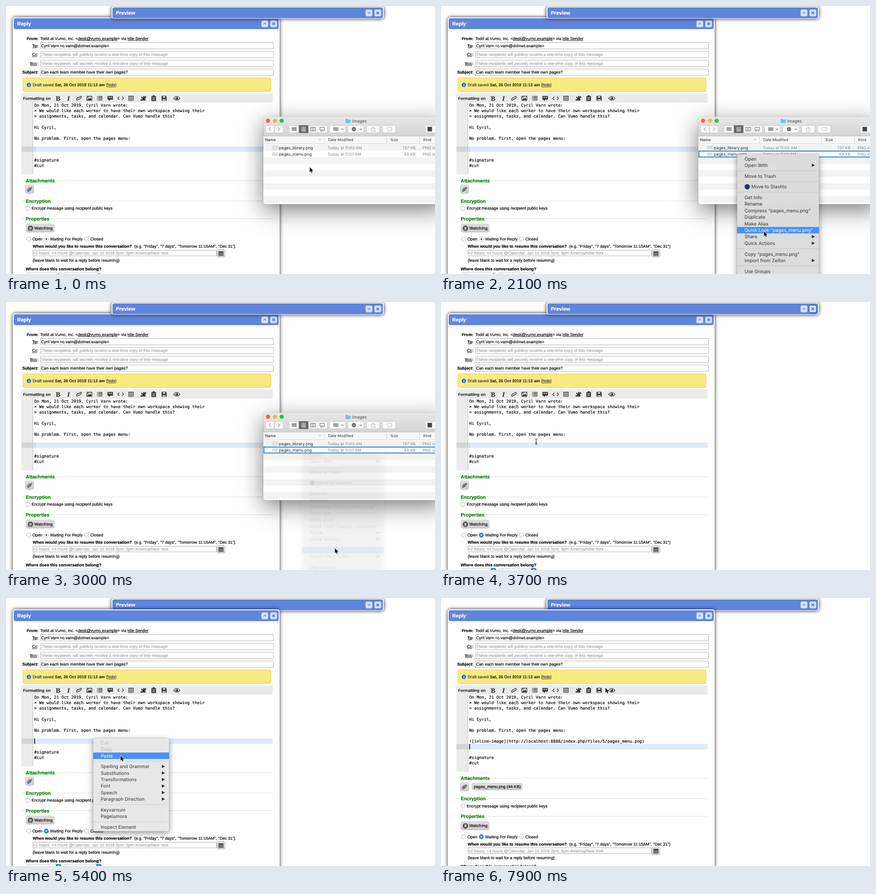
These frames come from a looping animation (947x591 px, 8 s). An HTML page with a canvas:

```html
<!DOCTYPE html>
<html lang="en">
<head>
<meta charset="utf-8">
<title>Pasting an image into a reply</title>
<style>
html, body { margin: 0; width: 100%; height: 100%; overflow: hidden; background: #fff; }
canvas { display: block; width: 947px; height: 591px; }
</style>
</head>
<body>
<canvas id="stage" width="947" height="591"></canvas>
<script>
const c = document.getElementById('stage').getContext('2d');
const SANS = '"Liberation Sans", Arial, sans-serif';
const SERIF = '"Liberation Serif", serif';
const UI = 'Inter, sans-serif';
const MONO = '"DejaVu Sans Mono", monospace';
const LOOP = 8000, STEP = 100, LINE = 12.1;
const BLUE = '#6085dc', SELECT = '#4990f6', INK = '#333';

// Moments of the story, in ms
const FILE_MENU = 1400, ACTIVATE = 3700, EDIT_MENU = 4400, PASTED = 5700;

// Pointer path: time, x, y
const POINTER = [
  [0, 670.5, 355.5], [600, 654, 326], [1800, 654, 326], [2100, 713, 497],
  [2400, 716, 500], [2700, 726, 543], [3000, 726, 543], [3600, 210, 308],
  [4000, 210, 308], [4300, 192, 309], [4500, 192, 309], [4900, 253, 348],
  [5900, 253, 348], [6300, 155, 312], [6800, 155, 312], [7700, 376, 156],
  [7900, 363, 198]
];

const FILE_ITEMS = ['Open', 'Open With>', '', 'Move to Trash', '', '@Move to Stashlo', '',
  'Get Info', 'Rename', 'Compress “pages_menu.png”', 'Duplicate', 'Make Alias',
  'Quick Look “pages_menu.png”', 'Share>', 'Quick Actions>', '',
  'Copy “pages_menu.png”', 'Import from Zelfon>', '', 'Use Groups'];
const EDIT_ITEMS = ['~Cut', '~Copy', 'Paste', '', 'Spelling and Grammar>', 'Substitutions>',
  'Transformations>', 'Font>', 'Speech>', 'Paragraph Direction>', '',
  'Keyvarnum', 'Pagelumora', '', 'Inspect Element'];

function pointerAt(t) {
  const i = POINTER.findIndex(k => k[0] > t);
  if (i < 0) return POINTER.at(-1).slice(1);
  const [t0, x0, y0] = POINTER[i - 1], [t1, x1, y1] = POINTER[i];
  const p = (t - t0) / (t1 - t0), e = p * p * (3 - 2 * p);
  return [x0 + (x1 - x0) * e, y0 + (y1 - y0) * e];
}

// y is the middle of the capital letters; returns the end of the text
function text(s, x, y, { size = 9.08, font = SANS, color = '#000', style = '', under, align = 'left' } = {}) {
  c.font = `${style} ${size}px ${font}`;
  c.textRendering = 'geometricPrecision';
  c.textAlign = align;
  c.fillStyle = c.strokeStyle = color;
  const base = y + size * .36, w = c.measureText(s).width;
  c.fillText(s, x, base);
  if (font !== UI) {
    // a hair of extra weight, like smoothed screen type
    c.lineWidth = .22;
    c.strokeText(s, x, base);
  }
  if (under) c.fillRect(align === 'right' ? x - w : x, base + 1.1, w, .8);
  return x + w;
}
const bold = (s, x, y, o) => text(s, x, y, { style: 'bold', ...o });

function rect(x, y, w, h, fill) {
  c.fillStyle = fill;
  c.fillRect(x, y, w, h);
}

function box(x, y, w, h, r, fill, line, width = 1) {
  c.beginPath();
  c.roundRect(x, y, w, h, r);
  if (fill) { c.fillStyle = fill; c.fill(); }
  if (line) { c.strokeStyle = line; c.lineWidth = width; c.stroke(); }
}

function disc(x, y, r, fill, line) {
  box(x - r, y - r, 2 * r, 2 * r, r, fill, line);
}

function shadowBox(x, y, w, h, r, fill, blur, dy, shade) {
  c.save();
  c.shadowColor = shade;
  c.shadowBlur = blur;
  c.shadowOffsetY = dy;
  box(x, y, w, h, r, fill);
  c.restore();
}

function path(x, y, d, { fill, line, width = 1.2 } = {}) {
  const p = new Path2D(d);
  c.save();
  c.translate(x, y);
  c.lineWidth = width;
  c.lineJoin = 'round';
  if (line) { c.strokeStyle = line; c.stroke(p); }
  if (fill) { c.fillStyle = fill; c.fill(p, 'evenodd'); }
  c.restore();
}

function grey(y, h, top, bottom) {
  const g = c.createLinearGradient(0, y, 0, y + h);
  g.addColorStop(0, top);
  g.addColorStop(1, bottom);
  return g;
}

function panel(x, y, w, h, title, chevron, focused) {
  shadowBox(x, y, w, h, 5, '#fff', 9, 0, '#222');
  box(x + 2, y + 2, w - 4, 24, 4, BLUE);
  bold(title, x + 9.5, y + 14.3, { size: 11.35, color: '#fff' });
  const by = y + 7, bx = x + w;
  if (focused) box(bx - 21.5, by - 1, 17, 17, 5, '#2d6fd8', '#2465cf', 2);
  for (const left of [bx - 40, bx - 20.5]) box(left, by, 14.5, 14.5, 3, '#d5e2fa', '#b9cdf5', .8);
  path(bx - 32.7, by + 7.2, chevron, { line: '#4c74c8', width: 1.4 });
  path(bx - 13.2, by + 7.2, 'M-2.6-2.6L2.6 2.6M2.6-2.6L-2.6 2.6', { line: '#4a72c8', width: 2 });
}

const preview = focused => panel(233, 1, 601, 27, 'Preview', 'M-2.2-1L0 1.2L2.2-1', focused);

function field(label, y, value, { hint, strong, link } = {}) {
  const style = strong ? 'bold' : '';
  text(':', 71.5, y, { style, align: 'right' });
  text(label, 68.5, y, { style, align: 'right', under: link });
  box(76.5, y - 7, 514, 14, 0, '#fff', '#b0b0b0');
  text(value, 77.5, y, { color: hint ? '#a2a2a2' : '#000' });
}

function toolbar() {
  rect(34, 193, 555, 20, '#ebebeb');
  bold('Formatting on', 37.5, 203.5, { color: INK });
  const y = 203.5, stroke = { line: INK }, solid = { fill: INK };
  text('B', 115, y, { size: 15, font: SERIF, style: 'bold', align: 'center', color: INK });
  text('I', 138, y, { size: 15, font: SERIF, style: 'italic bold', align: 'center', color: INK });
  path(161, y, 'M-1 2L-2.5 3.7Q-4 5-5 3.8Q-6 2.5-4.6 1L-2-1.5Q-.7-2.6.6-1M1-2L2.5-3.7Q4-5 5-3.8Q6-2.5 4.6-1L2 1.5Q.7 2.6-.6 1', { line: INK, width: 1.5 });
  path(184, y, 'M-5.5-4.5H5.5V4.5H-5.5Z', { line: INK, width: 1.4 });
  path(184, y, 'M-4.5 3.5L-2-.5L0 1.5L2-2L4.6 3.5ZM-4-3.2H-2V-1.2H-4Z', solid);
  path(207, y, 'M-3.2-4H6M-3.2-1.3H6M-3.2 1.4H6M-3.2 4.1H6M-6-4H-4.4M-6-1.3H-4.4M-6 1.4H-4.4M-6 4.1H-4.4', { line: INK, width: 1.4 });
  path(230, y, 'M-6-5H6V3H0L-3 6V3H-6ZM-3.5-3V-.5H-1V-3ZM1-3V-.5H3.5V-3Z', solid);
  path(253, y, 'M-3-3.5L-6.5 0L-3 3.5M3-3.5L6.5 0L3 3.5', { line: INK, width: 1.5 });
  path(276, y, 'M-5.5-5H5.5V5H-5.5ZM-5.5-3.5H5.5M-5.5-.5H5.5M-5.5 2.3H5.5M-2-4V5M2-4V5', { line: INK, width: .9 });
  rect(289.5, 197, 1, 13, '#ccc');
  path(303, y, 'M-6 5V2H-1L-5-2L-3-4L0-1V-5H3L2.5-2L5-5L7-3L3 2H6L4 5Z', solid);
  path(326, y, 'M-5-5H-2V-6.5H2V-5H5V6H-5ZM-3-2.5V-1.5H3V-2.5ZM-3 0V1H3V0ZM-3 2.5V3.5H3V2.5Z', solid);
  path(349, y, 'M-5.5-5.5H4L5.5-4V5.5H-5.5ZM-2.8-4.5V-1.5H2.5V-4.5ZM-3 1.5V5.5H-1V2.5H1V5.5H3V1.5Z', solid);
  path(377, y, 'M-7 0Q0-8.5 7 0Q0 8.5-7 0Z', stroke);
  disc(377, y, 2.9, INK);
  disc(376.2, y - 1, 1, '#fff');
}

function editor(t) {
  const pasted = t >= PASTED, active = pasted ? 9 : 8;
  const h = 158 + (pasted ? LINE : 0), rowY = 309.7 + (active - 8) * LINE;
  rect(34, 213, 25.5, h, '#ebebeb');
  rect(34, rowY, 25.5, LINE, '#d4d4d4');
  rect(59, 213, 1, h, '#bdbdbd');
  rect(60, rowY, 529, LINE, '#e0eaf8');
  const lines = ['On Mon, 21 Oct 2019, Cyril Varn wrote:',
    '> We would like each worker to have their own workspace showing their',
    '> assignments, tasks, and calendar. Can Vumo handle this?', '',
    'Hi Cyril,', '', 'No problem. First, open the pages menu:', '',
    pasted ? '![inline-image](http://localhost:8888/index.php/files/5/pages_menu.png)' : '',
    ...(pasted ? [''] : []), '', '#signature', '#cut'];
  lines.forEach((s, i) => text(s, 62.3, 219 + i * LINE, { size: 9.05, font: MONO }));
  if (t < EDIT_MENU) rect(62.5, rowY + .5, 1, 11, '#a3b6d6');
  else if ((t - (pasted ? PASTED : EDIT_MENU)) % 1000 < 500) rect(62.4, rowY + .3, 1.7, 11.5, '#000');
}

function legend(s, y) {
  rect(36, y - .5, 552, 1, '#dcdcdc');
  c.font = `bold 10.6px ${SANS}`;
  rect(42, y - 6, c.measureText(s).width + 3, 12, '#fff');
  bold(s, 43.5, y, { size: 10.6, color: '#007d00' });
}

function button(x, y, w, h) {
  box(x, y, w, h, 4, grey(y, h, '#e0e0e0', '#cbcbcb'), '#c4c4c4', .8);
}

function radio(x, y, label, on, lit) {
  disc(x, y, 4.8, on && lit ? '#2b7ff0' : '#fff', on && lit ? '#2270dd' : '#b4b4b4');
  if (on) disc(x, y, 1.8, lit ? '#fff' : '#333');
  text(label, x + 8.2, y);
}

function select(x, y, w, label, lit) {
  box(x, y, w, 15, 4, '#fff', '#c0c0c0');
  if (lit) box(x + w - 11.5, y - .3, 12, 15.6, [0, 4, 4, 0], '#2b7ff0');
  text(label, x + 5, y + 7, { color: INK });
  path(x + w - 5.5, y + 5, 'M-2 0L0-2.2L2 0M-2 4L0 6.2L2 4', { line: lit ? '#fff' : '#333' });
}

function form(t) {
  const lit = t >= ACTIVATE;
  legend('Attachments', 385);
  button(42.5, 394.5, 19, 19);
  path(52, 404, 'M3.2-2L-1.6 2.8Q-2.7 3.6-3.2 2.5Q-3.3 1.9-2.5 1.1L2.5-3.9Q4-5.2 5-3.9Q5.8-2.8 4.7-1.6L-.9 4Q-3 5.8-4.8 4Q-6 2.2-4.5.6L.3-4.1', { line: '#555' });
  if (t >= PASTED) {
    button(68, 396, 111.5, 15);
    text('pages_menu.png (44 KB)', 72.5, 403.6);
  }
  legend('Encryption', 430);
  box(44, 442, 8.5, 8.5, 2, '#fff', '#b8b8b8');
  text('Encrypt message using recipient public keys', 56.5, 446);
  legend('Properties', 469);
  button(44, 480.5, 62.5, 18.5);
  disc(54, 490, 6, '#555');
  bold('0', 54, 490, { size: 8, color: '#fff', align: 'center' });
  bold('Watching', 62.5, 489.7, { color: INK });
  radio(50, 514, 'Open', false, lit);
  radio(89, 514, 'Waiting For Reply', true, lit);
  radio(178, 514, 'Closed', false, lit);
  bold('When would you like to resume this conversation?', 59, 530);
  text('(e.g. "Friday", "7 days", "Tomorrow 11:15AM", "Dec 31")', 283, 530);
  box(59.5, 538.5, 405, 12.5, 0, '#fff', '#aaa');
  text('+2 hours; +4 hours @Calendar; Jan 15 2018 2pm; 5pm America/New York', 60, 545, { color: '#a2a2a2' });
  button(465.5, 536.5, 18, 17.5);
  path(474.5, 546, 'M-5-4.5H5V4.5H-5ZM-5-2H5M-5 .2H5M-5 2.4H5M-2.5-2V4.5M0-2V4.5M2.5-2V4.5', { line: '#444', width: 1 });
  rect(469, 541, 11, 2.5, '#444');
  text('(leave blank to wait for a reply before resuming)', 59, 560.5);
  bold('Where does this conversation belong?', 43.5, 579.5);
  select(45.5, 587, 76, 'Current group', lit);
  select(127.5, 587, 83, 'Conversations', lit);
}

function reply(t) {
  panel(15, 25, 589, 620, 'Reply', 'M-2.2 1L0-1.2L2.2 1');
  bold('From:', 71.5, 71.5, { align: 'right' });
  let x = text('Todd at Vumo, Inc. <', 75.5, 71.5);
  x = text('desk@vumo.example', x, 71.5, { under: true });
  x = text('> via ', x, 71.5);
  text('Idle Sender', x, 71.5, { under: true });
  field('To', 87.5, 'Cyril Varn <c.varn@dolmet.example>', { strong: true, link: true });
  field('Cc', 107, 'These recipients will publicly receive a one-time copy of this message', { hint: true, link: true });
  field('Bcc', 126.5, 'These recipients will secretly receive a one-time copy of this message', { hint: true, link: true });
  field('Subject', 146, 'Can each team member have their own pages?', { strong: true });

  box(37.5, 158.5, 547.5, 30, 3, '#f9e982', '#e2cd55');
  disc(50.5, 174, 4.8, '#1a6fe0');
  bold('i', 50.5, 174, { size: 8, font: SERIF, color: '#fff', align: 'center' });
  x = text('Draft saved ', 58.8, 174, { color: INK });
  x = bold('Sat, 26 Oct 2019 11:12 am', x, 174, { color: INK });
  x = text(' (', x, 174, { color: INK });
  x = text('hide', x, 174, { under: true, color: INK });
  text(')', x, 174, { color: INK });

  toolbar();
  editor(t);
  c.save();
  if (t >= PASTED) c.translate(0, 12.4);
  form(t);
  c.restore();
}

function finderButtons() {
  const icon = { line: '#666', width: 1.1 }, nav = { line: '#999', width: 1.1 }, y = 271.5;
  for (const [x, w] of [[573, 19], [593, 19], [625, 84], [714.5, 34.5], [754.5, 35.5], [796, 29], [831, 29], [925.5, 30]])
    box(x, 263.5, w, 16, 3, '#fafafa', '#c3c3c3', .8);
  rect(646.5, 263, 21, 17, '#656565');
  rect(688, 264, .8, 15, '#c8c8c8');
  path(582.5, y, 'M2-4L-2 0L2 4', nav);
  path(602.5, y, 'M-2-4L2 0L-2 4', nav);
  for (const x of [636, 728])
    for (let i = 0; i < 6; i++) box(x - 5 + i % 3 * 3.8, y - 3.5 + (i > 2) * 4, 2.4, 2.6, 0, null, '#555', .9);
  path(657, y, 'M-5-4H5M-5-1.3H5M-5 1.4H5M-5 4.1H5', { line: '#fff', width: 1.1 });
  path(678, y, 'M-5.5-4H5.5V4H-5.5ZM-1.8-4V4M1.8-4V4', icon);
  path(698, y, 'M-5-4H5V1.5H-5ZM-5 4H5', icon);
  path(742, y, 'M-2.3-1L0 1.3L2.3-1', icon);
  path(783, y, 'M-2.3-1L0 1.3L2.3-1', icon);
  path(768, y, 'M0-5.2V5.2M-5.2 0H5.2M-3.6-3.6L3.6 3.6M3.6-3.6L-3.6 3.6', { line: '#555', width: 1.6 });
  disc(768, y, 3.5, '#555');
  disc(768, y, 1.3, '#fafafa');
  path(810.5, y, 'M-1.5-2H-4V5H4V-2H1.5M0 2V-5M-2-3L0-5L2-3', { line: '#aaa', width: .9 });
  path(845.5, y, 'M-3-3.5H6V3.5H-3L-6 0Z', { line: '#b5b5b5', width: 1 });
  rect(930.5, 266.5, 10, 10, '#444');
}

function finder(selected) {
  shadowBox(568, 244.5, 400, 192.5, 5, '#fff', 50, 14, 'rgba(0,0,0,.5)');
  shadowBox(568, 244.5, 400, 192.5, 5, '#fff', 2, 0, 'rgba(0,0,0,.4)');
  c.save();
  c.beginPath();
  c.roundRect(568, 244.5, 400, 192.5, 5);
  c.clip();
  rect(568, 244, 400, 43, grey(244, 43, '#e9e9e9', '#d3d3d3'));
  ['#fc5b57', '#f5b62f', '#29c33f'].forEach((color, i) => disc(578.5 + 15 * i, 253, 4.6, color));
  path(749.5, 249, 'M0 0H4.5L6 1.4H11.5V9H0Z', { fill: '#71c2ec' });
  text('images', 764.5, 253.3, { size: 9.4, font: UI, color: '#444' });
  finderButtons();
  rect(568, 286.5, 400, 1, '#b8b8b8');
  rect(568, 287.5, 400, 16, '#f7f7f7');
  rect(568, 303, 400, 1, '#d5d5d5');
  const head = { size: 8.4, font: UI, color: '#333' };
  text('Name', 572, 294.7, { ...head, style: '500' });
  text('Date Modified', 711, 294.7, head);
  text('Size', 848.5, 294.7, head);
  text('Kind', 921, 294.7, head);
  path(693, 294.5, 'M-2.3 1.2L0-1.2L2.3 1.2', { line: '#777', width: .9 });
  for (const x of [702.5, 839.5, 912.5]) rect(x, 288, 1, 15, '#d0d0d0');
  for (let i = 0; i < 5; i++) rect(568, 305 + i * 28.6, 400, 14.3, '#f3f3f3');
  if (selected) box(569.5, 320, 400, 13, 0, '#fff', '#2d83d8', 2);
  [['pages_library.png', '03', '137 KB'], ['pages_menu.png', '01', '44 KB']].forEach(([name, min, size], i) => {
    const y = 312.5 + i * 14.3, dim = { size: 8.9, font: UI, color: '#858585' };
    box(588, y - 4 + i, 11, 8 - 2 * i, 0, '#f4f4f4', '#bbb', .8);
    path(593.5, y, i ? 'M-3.5 1L-1-1L1 1L4-1' : 'M-3.5-1.5H-1M-3.5 1H-1M1-1.5H3.5M1 1H3.5', { line: '#888', width: .9 });
    text(name, 602.3, y, { size: 8.95, font: UI, color: '#222' });
    text(`Today at 11:${min} AM`, 710, y, dim);
    text(size, 904, y, { ...dim, align: 'right' });
    text('PNG image', 919.5, y, dim);
  });
  c.restore();
}

function menu(items, x, top, w, h, fill, [px, py], alpha) {
  c.save();
  c.globalAlpha = alpha;
  shadowBox(x, top, w, h, 4, fill, 14, 4, 'rgba(0,0,0,.45)');
  box(x, top, w, h, 4, null, 'rgba(0,0,0,.16)', .8);
  let y = top + 10;
  for (const item of items) {
    if (!item) {
      rect(x, y - 2.9, w, 1, 'rgba(0,0,0,.11)');
      y += 9.3;
      continue;
    }
    const off = item[0] === '~', badge = item[0] === '@';
    const hot = !off && px >= x && px < x + w && Math.abs(py - y) < 7.2;
    const color = hot ? '#fff' : off ? '#b4b4b4' : '#333';
    if (hot) rect(x, y - 7, w, 14.2, SELECT);
    if (badge) disc(x + 22.5, y, 5.8, '#12356f');
    text(item.replace(/[~@>]/g, ''), x + (badge ? 31.5 : 16.5), y, { size: 10.3, font: UI, color });
    if (item.endsWith('>')) path(x + w - 16, y, 'M0-3.6L7 0L0 3.6Z', { fill: color });
    y += 14.4;
  }
  c.restore();
}

function pointer([x, y], beam) {
  if (beam) {
    const d = 'M-2.5-6Q0-6 0-4.5Q0-6 2.5-6M0-4.5V4.5M-2.5 6Q0 6 0 4.5Q0 6 2.5 6M-1.5 2H1.5';
    path(x, y, d, { line: 'rgba(255,255,255,.8)', width: 2.4 });
    path(x, y, d, { line: '#111', width: 1.1 });
  } else {
    path(x, y, 'M0 0V10.8L2.5 8.6L4.1 12.4L6 11.6L4.4 7.8H7.7Z', { line: '#fff', width: 1.6, fill: '#000' });
  }
}

// Opaque until it starts to fade, gone two steps later
function menuAlpha(t, open, fade) {
  if (t < open || t >= fade + 200) return 0;
  return t < fade ? 1 : t < fade + 100 ? .5 : .1;
}

function draw(t) {
  const at = pointerAt(t);
  rect(0, 0, 947, 591, '#fff');
  if (t < EDIT_MENU) {
    reply(t);
    preview(t >= ACTIVATE);
  } else {
    preview(false);
    reply(t);
  }
  if (t < ACTIVATE) finder(t >= FILE_MENU);
  const fileAlpha = menuAlpha(t, FILE_MENU, 2900);
  const editAlpha = menuAlpha(t, EDIT_MENU, 5500);
  if (fileAlpha) menu(FILE_ITEMS, 653.5, 326.8, 181, 300, 'rgba(222,222,222,.97)', at, fileAlpha);
  if (editAlpha) menu(EDIT_ITEMS, 192.5, 309, 167.5, 205.5, 'rgba(236,236,236,.95)', at, editAlpha);
  const overText = at[0] > 60 && at[0] < 589 && at[1] > 213 && at[1] < 371;
  pointer(at, overText && !editAlpha);
}

let shown = -1;
const start = performance.now();
function tick() {
  const t = Math.floor((performance.now() - start) % LOOP / STEP) * STEP;
  if (t !== shown) draw(shown = t);
  requestAnimationFrame(tick);
}
tick();
</script>
</body>
</html>
```
